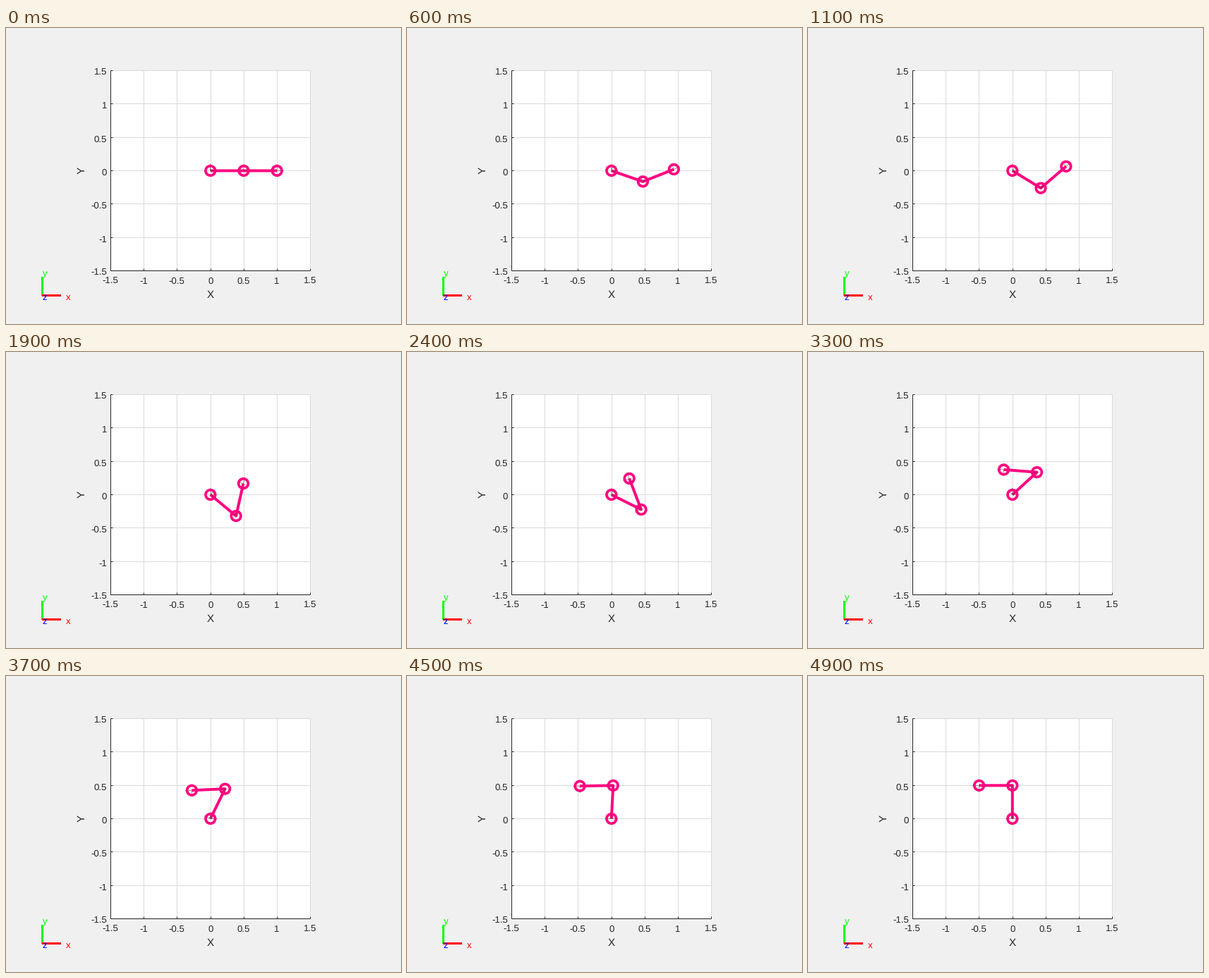
Animation, 560 px wide and 420 px high, one loop 5000 ms. Source, as a matplotlib script:

```python
import numpy as np
import matplotlib.pyplot as plt
from matplotlib.animation import FuncAnimation
from matplotlib.patches import Circle

WIDTH, HEIGHT, DPI = 560, 420, 100
FRAMES, INTERVAL = 50, 100
MOVE_TIME = 4880
LEFT, RIGHT, TOP, BOTTOM = 148.5, 431.5, 60.5, 344.5
CENTER_X, CENTER_Y, SCALE = 289.8, 202.5, 94.4
LIMIT, LINK, AXIS_LENGTH = 1.5, 0.5, 0.1
PINK, INK, GRID = "#ff0080", "#262626", "#dadada"
START, END = np.array([1.0, 0.0]), np.array([-0.5, 0.5])

plt.rcParams["font.family"] = "Liberation Sans"
plt.rcParams["text.hinting"] = "none"
fig = plt.figure(figsize=(WIDTH / DPI, HEIGHT / DPI), dpi=DPI, facecolor="#f0f0f0")
ax = fig.add_axes([0, 0, 1, 1])
ax.set(xlim=(0, WIDTH), ylim=(HEIGHT, 0))
ax.axis("off")


def pt(pixels):
    return pixels * 72 / DPI


def to_px(x, y):
    return CENTER_X + SCALE * x, CENTER_Y - SCALE * y


def line(xs, ys, color, width=1, **kw):
    kw.setdefault("solid_capstyle", "butt")
    return ax.plot(xs, ys, color=color, lw=pt(width), snap=False, **kw)[0]


def text(x, y, label, size=13.3, color=INK, ha="center", **kw):
    ax.text(x, y, label, fontsize=pt(size), color=color, ha=ha, va="baseline", **kw)


def draw_plot_area():
    ax.fill([LEFT, RIGHT, RIGHT, LEFT], [TOP, TOP, BOTTOM, BOTTOM],
            color="white", lw=0, zorder=0, snap=False)
    values = np.arange(-LIMIT, LIMIT + 0.1, 0.5)
    columns = np.floor(np.linspace(LEFT, RIGHT, len(values))) + 0.5
    rows = np.floor(np.linspace(BOTTOM, TOP, len(values))) + 0.5
    for value, x, y in zip(values, columns, rows):
        line([x, x], [TOP, BOTTOM], GRID, zorder=1)
        line([LEFT, RIGHT], [y, y], GRID, zorder=1)
        line([x, x], [BOTTOM - 3, BOTTOM], INK, zorder=2)
        line([LEFT, LEFT + 3], [y, y], INK, zorder=2)
        text(x - 0.5, 363, f"{value:g}")
        text(143, y + 6.5, f"{value:g}", ha="right")
    line([LEFT, LEFT], [TOP, BOTTOM + 0.5], INK, zorder=2)
    line([LEFT, RIGHT], [BOTTOM, BOTTOM], INK, zorder=2)
    text(290, 383, "X", 15.2)
    text(112, 202, "Y", 15.2, rotation=90, rotation_mode="anchor")


def draw_orientation_key():
    line([51.5, 51.5], [353, 380], "#00ff00", 3)
    line([51, 78], [379.5, 379.5], "#ff0000", 3)
    text(88, 386, "x", color="#ff0000")
    text(55, 352, "y", color="#00ff00")
    text(55, 386, "z", color="#0000ff")


def pose(progress):
    """Joint positions and link angles with the tip on a straight path."""
    s = progress ** 2 * (3 - 2 * progress)
    tip = START + s * (END - START)
    bend = np.arccos(min(1, np.hypot(*tip) / (2 * LINK)))
    heading = np.arctan2(tip[1], tip[0])
    first, second = heading - bend, heading + bend
    elbow = LINK * np.array([np.cos(first), np.sin(first)])
    return [np.zeros(2), elbow, tip], first, second


draw_plot_area()
draw_orientation_key()
arm = line([], [], PINK, 4, zorder=3, solid_joinstyle="round")
rings = [ax.add_patch(Circle((0, 0), 6.8, fill=False, ec=PINK, lw=pt(3.7), zorder=5))
         for _ in range(3)]
body_axes = [(line([], [], "#803030", 0.7, zorder=4, alpha=0.8),
              line([], [], "#307030", 0.7, zorder=4, alpha=0.8)) for _ in range(4)]


def update(frame):
    joints, first, second = pose(min(1, frame * INTERVAL / MOVE_TIME))
    arm.set_data(*to_px(*np.transpose(joints)))
    for ring, joint in zip(rings, joints):
        ring.center = to_px(*joint)
    bodies = [(joints[0], 0), (joints[0], first), (joints[1], second), (joints[2], second)]
    for pair, (origin, angle) in zip(body_axes, bodies):
        for stroke, turn in zip(pair, (angle, angle + np.pi / 2)):
            end = origin + AXIS_LENGTH * np.array([np.cos(turn), np.sin(turn)])
            stroke.set_data(*to_px(*np.transpose([origin, end])))
    return [arm, *rings]


anim = FuncAnimation(fig, update, frames=FRAMES, interval=INTERVAL,
                     repeat=True, repeat_delay=0, blit=False)
plt.show()
```
